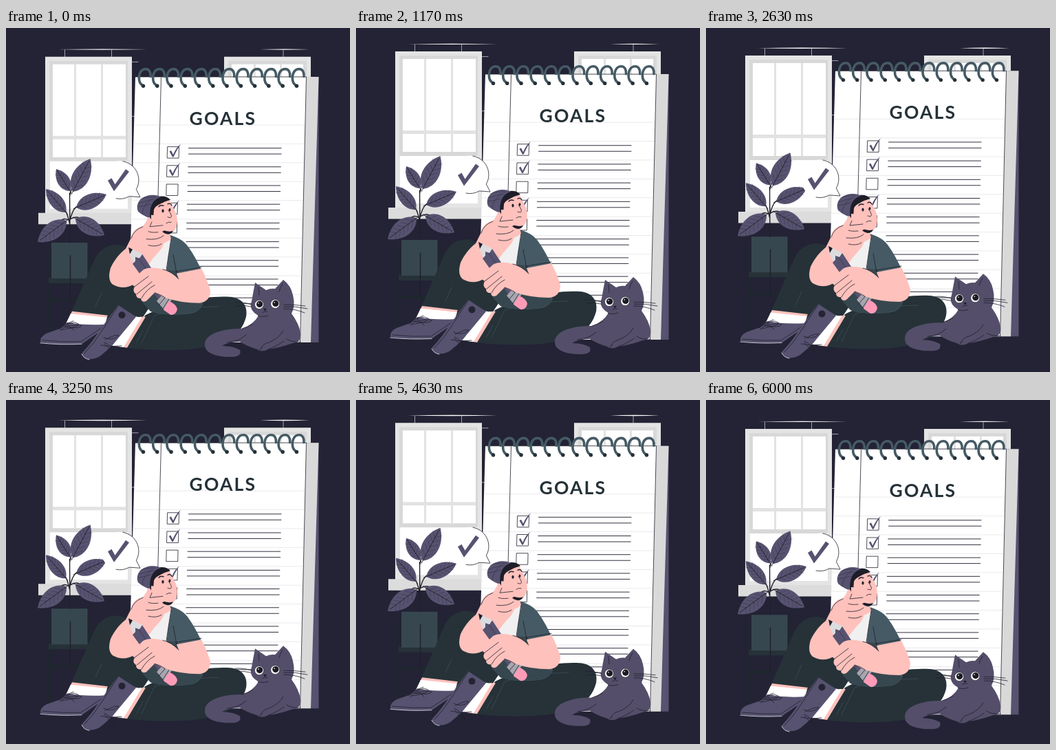
An HTML page for the animation above (6040 ms loop, 500x500 px).

```html
<!DOCTYPE html>
<html lang="en">
<head>
<meta charset="utf-8">
<title>Goals</title>
<style>
  html, body { margin: 0; width: 100%; height: 100%; overflow: hidden; background: #232335; }
  svg { display: block; width: 100vw; height: 100vh; }
  path, line { stroke-linecap: round; stroke-linejoin: round; }
  .purple { fill: #575270; }
  .cat { fill: #544e6a; }
  .skin { fill: #ffc1bc; }
  .dark { fill: #263238; }
  .teal { fill: #455a64; }
  .white { fill: #fff; }
  .ink { fill: none; stroke: #20202c; stroke-width: .8; }
  .bold { fill: none; stroke: #20202c; stroke-width: 1.4; }
  .fold { fill: none; stroke: #40515a; stroke-width: .7; }
  .rail { fill: none; stroke: #d8d8de; stroke-width: .7; }
  .title { font: 700 26.5px Lato, "Open Sans", sans-serif; letter-spacing: 2.2px; fill: #263238; }
</style>
</head>
<body>
<svg viewBox="0 0 500 500">
  <g class="fast">
    <path class="white" d="M75 31.300Q140 29.900 205 31.300Q140 32.700 75 31.300ZM369 31.300Q405 29.900 441 31.300Q405 32.700 369 31.300Z"/>
    <path class="rail" d="M85.500 32V42M153.500 32V42M403 32V42M183 49.500H192M183 128.500H187"/>
    <path fill="#e4e4e4" d="M57 42H183V270H57ZM317 42H443V200H317Z"/>
    <path fill="#d8d8d8" d="M63 48H177V194H63ZM323 48H437V194H323Z"/>
    <path class="white" d="M68 53H174V188H68ZM328 53H432V188H328ZM64 194H177V263H64Z"/>
    <path fill="#e2e2e2" d="M99 53h3v135h-3ZM138 53h3v135h-3ZM68 157H174v5H68ZM360 53h3v135h-3ZM398 53h3v135h-3Z"/>
    <path fill="#dcdcdc" d="M47 269H190V285.500H47Z"/>
  </g>

  <g class="slow">
    <path class="purple" d="M436 71H454.500V457H426Z"/>
    <path fill="#d9d9d9" d="M436 71H454.500L443 457H426Z"/>
    <path class="white" d="M188 71H436.500L427.500 457H177Z"/>
    <g id="rules"></g>
    <path class="ink" d="M188 71H436.500L427.500 457M225.500 72L215.500 457"/>
    <g id="rings"></g>
    <text class="title" x="266.500" y="140.800">GOALS</text>
    <g id="tasks"></g>
  </g>

  <g class="slow">
    <path fill="none" stroke="#1e282d" stroke-width="3" d="M63 324V450M121.500 324V440M62 367H123M62 395H122"/>
    <path class="dark" d="M62 363H123V371H62Z"/>
    <path fill="#37474f" d="M66 312H118.500V364H66Z"/>
    <path class="bold" d="M93.500 331V395"/>
    <path class="bold" d="M93 312L92.500 240M92.500 281Q97 262 104 259M92.500 284Q88 265 84 263M92.500 280Q84 274 78 282M93 278Q104 271 112 280M92.500 245Q94 234 100 225"/>
    <g id="leaves"></g>
  </g>

  <g class="fast">
    <path class="white" d="M189.300 234.800L195 246L179.300 244.800A27.500 27.500 0 1 1 189.300 234.800Z"/>
    <path class="ink" d="M170 194A27.500 27.500 0 0 1 189.300 234.800L195 246L179.300 244.800A27.500 27.500 0 0 1 160 248"/>
    <path class="purple" d="M148 222L153.500 218.500L158.500 227.500L174 205.500L179 209L157 237.500Z"/>
  </g>

  <g class="fast">
    <!-- legs -->
    <path class="dark" d="M95 413L128 338C138 314 164 309 180 323L214 398L196 425L146 428Z"/>
    <path class="dark" d="M174 465L202 418C229 403 291 388 325 391C343 392 352 404 349 420C341 451 314 461 279 466C241 470 205 469 174 465Z"/>
    <path class="fold" d="M197 458L216 418Q250 406 309 405M130 405L139 385M190 457L199 440"/>
    <!-- shoes and socks -->
    <path class="skin" d="M96 412L148 418L145 424L93 418Z"/>
    <path class="white" d="M94 415.500L147 421L143 434L87 430Z"/>
    <path class="purple" d="M50 457Q49 449 59 444L79 437L89 428Q114 433 145 431L137 441L111 459Q80 462 50 457Z"/>
    <path fill="none" stroke="#d9d9e2" stroke-width=".9" d="M50 458Q78 461 110 459.500"/>
    <path class="ink" d="M53 454Q81 457 109 456L139 436M77 438Q88 429 98 426M79 440Q95 423 105 430Q109 434 80 439M84 435Q105 430 110 433Q107 438 86 435M89 431L99 440"/>
    <path class="skin" d="M194 420L203 420L176 465L162 463Z"/>
    <path class="white" d="M185 419L197 421L171 464L154 462Z"/>
    <path class="purple" d="M163 403L189 420L155 461Q147 469 137 477Q127 483 117 481Q109 477 111 472Q126 456 135 441Z"/>
    <path fill="none" stroke="#d9d9e2" stroke-width=".9" d="M110 474Q113 481 121 482"/>
    <path class="ink" d="M163 404L139 441Q128 459 114 473M142 450Q155 456 164 447Q160 445 144 453M143 457Q154 462 159 474Q151 469 143 459M138 461L151 463L168 462"/>
    <circle cx="168.500" cy="417.500" r="5" fill="#242432"/>

    <!-- torso -->
    <path class="teal" d="M238 301C250 305 258 309 264 317C272 328 279 341 284 352L258 358L286 401Q281 415 262 416Q229 419 210 412L196 396L202 315Z"/>
    <path fill="#37474f" d="M233 352L249 353L266 391L285 402Q280 416 255 416Q226 418 210 412L196 396L202 370Z"/>
    <path fill="#f0f0f0" d="M207 312L235 300L240 309L236 332L233 356L199 368Z"/>
    <path class="ink" d="M240 306L236 332L233 352M247 354L284 348M248 357L243 330"/>

    <!-- head -->
    <path class="skin" d="M210 258L236 247L242 259L247 269Q250 279 248 288Q245 297 238 299L240 307Q225 319 209 312L214 288Z"/>
    <path fill="#1d1e28" d="M224 291Q233 298 243 295Q241 300 235 300Q227 299 224 291Z"/>
    <path fill="#1d1e28" d="M207 274Q205 255 218 246Q232 242 239 250Q231 252 224 256Q217 259 215 264L214 277Q211 281 208 278Z"/>
    <path class="purple" d="M191 264C189 251 200 243 214 243Q221 243 225 246C213 249 208 260 209.500 277Q199 273 192 267Z"/>
    <path class="ink" opacity=".5" d="M193 255Q203 251 215 249M192 260Q201 259 210 256M195 249Q204 245 217 246M198 271Q198 259 211 249"/>
    <path class="skin" d="M211 272Q218 271 218 279Q217 286 211 283Z"/>
    <path class="bold" d="M222 260Q224 257 229 258.500M235 256Q239 254 241 258"/>
    <path class="ink" d="M236 265Q243 274 239 276L235 275M233 284Q236 281.500 240 282.500"/>
    <ellipse cx="228" cy="266" rx="1.600" ry="2.500" fill="#20202c"/>
    <ellipse cx="238" cy="264.500" rx="1.400" ry="2.300" fill="#20202c"/>

    <!-- raised arm -->
    <path class="skin" d="M182 305Q184 292 199 288Q205 281 206 276Q210 273 212 282L228 286Q234 289 231 294Q227 297 221 297L231 301Q233 309 226 321L213 336L187 372Q171 382 155 373Q147 366 152 349C157 338 165 328 174 321Z"/>
    <path class="ink" d="M212 282L209 289L228 287M221 297Q211 298 207 296M229 302Q221 309 204 307M226 314Q219 319 207 316M182 306Q185 294 199 289"/>

    <!-- pencil -->
    <path fill="#dcdcdf" d="M178 319L199 329L190 347Q181 340 178 319Z"/>
    <path fill="#20202c" d="M178 319L184 322L180 329Z"/>
    <path class="purple" d="M198 329L238 390L227 403L184 343L188 339L188 333L194 335Z"/>
    <path class="ink" d="M193 335L234 395" opacity=".5"/>
    <path fill="#a7a5ae" d="M229 386L241 395L230 410L219 397Z"/>
    <path fill="#ff9bb7" d="M237 397Q248 402 249 409Q247 418 239 417L229 410Z"/>
    <path class="ink" d="M233 390L222 403M237 394L228 408"/>

    <!-- resting arm -->
    <path class="skin" d="M248 357L284 350Q293 367 297 382Q297 398 281 400Q253 400 231 392L216 385L204 397Q197 400 196 393Q189 394 189 387Q183 383 187 376Q181 373 183 367L199 352Q209 346 228 351Q240 354 251 365Z"/>
    <path class="ink" d="M187 376L207 361M190 387L212 369M197 393Q204 380 216 374M216 385Q224 387 231 392M251 365Q241 354 228 351"/>
  </g>

  <g class="slow">
    <path class="cat" d="M362 370L378 381Q385 378 391 379L403 366Q414 374 417 388Q421 404 415 415Q426 430 428 443Q430 457 417 458Q397 465 381 467Q371 472 365 467Q351 463 340 456Q322 456 314 462Q330 462 340 468Q343 477 330 478Q298 479 290 466Q285 451 304 443Q322 436 343 437Q360 431 367 418Q352 410 357 397Z"/>
    <path class="ink" d="M366 418Q372 421 381 418M322 457Q338 456 349 446M343 437Q353 434 359 430M371 466Q373 459 382 457Q397 451 403 440M381 467Q391 464 404 455M369 468L372 464M408 452Q415 457 428 456M367 377L368 388M402 372Q398 378 397 383"/>
    <path class="ink" d="M357 402Q346 398 333 399M356 405Q345 402 335 404M404 405Q420 404 438 408M404 408Q420 408 434 414M404 402Q420 402 435 404"/>
    <g id="eyes"></g>
    <path class="bold" d="M375 408.500L378 408.500L376.500 410Z"/>
    <path class="ink" d="M373 413Q376 414 376.500 410Q377 414 380 412"/>
  </g>
</svg>
<script>
const LOOP = 6040, LIFT = 10, LEAD = 60;
const put = (id, html) => document.getElementById(id).insertAdjacentHTML('beforeend', html);
const path = (d, attrs) => `<path d="${d}" ${attrs}/>`;
const slant = y => (71 - y) * .026;

for (let i = 0; i < 12; i++) {
  put('rings', `<g transform="translate(${i * 20.27} 0)">` +
    path('M199.500 84C193 81 192 72 194.500 66C196.500 61 200 59.600 203 59.600C208.500 59.600 210.500 65 210 70.500',
      'fill="none" stroke="#455a64" stroke-width="3.6"') +
    '<circle cx="199.500" cy="84.300" r="2.700" fill="#263238"/></g>');
}

for (let i = 0; i < 11; i++) {
  const y = 141 + i * 27.4, dx = slant(y);
  put('rules', path(`M${188 + dx} ${y}H${436 + dx}`, 'stroke="#dcdce1" stroke-width=".6"'));
}

const done = [0, 1, 3];
for (let i = 0; i < 9; i++) {
  const y = 174.6 + i * 27.2, dx = slant(y) + 2.7;
  put('tasks', path(`M${265.5 + dx} ${y}H${400 + dx}M${265.5 + dx} ${y + 8.5}H${400 + dx}`, 'stroke="#30303f" stroke-width="1"'));
  if (i < 5) put('tasks', path(`M${235 + dx} ${y - 2}h16.500l-.4 16.500h-16.500Z`, 'class="ink"'));
  if (done.includes(i)) put('tasks', path(`M${237.5 + dx} ${y + 5}l2.500 -1.500l3 6q4 -10 11 -15.500q-6 9 -10.500 19h-1.500Z`, 'class="purple"'));
}

// A leaf spans base to tip; side veins branch off its midrib.
function leaf(bx, by, tx, ty, width) {
  const len = Math.hypot(tx - bx, ty - by), angle = Math.atan2(ty - by, tx - bx) * 180 / Math.PI;
  let veins = '';
  for (let k = 1; k < 6; k++) {
    const x = len * k * .14, w = width * .36;
    veins += `M${x} 0l${len * .14} ${w}M${x} 0l${len * .14} ${-w}`;
  }
  const side = s => `${len * .22} ${s * width * .78} ${len * .68} ${s * width * .72}`;
  put('leaves', `<g transform="translate(${bx} ${by}) rotate(${angle})">` +
    path(`M0 0C${side(-1)} ${len} 0C${len * .68} ${width * .72} ${len * .22} ${width * .78} 0 0Z`, 'class="purple"') +
    path(`M-4 0H${len * .92}`, 'class="ink"') +
    path(veins, 'class="ink" opacity=".35"') + '</g>');
}
leaf(97, 238, 122.5, 190, 22);
leaf(93, 237, 73, 205, 16);
leaf(87, 268, 58, 234, 17);
leaf(102, 261, 146, 242, 19);
leaf(88, 280, 46, 311, 22);
leaf(101, 277, 143, 301, 21);

for (const [x, y] of [[368, 402], [391.2, 401]])
  put('eyes', `<circle cx="${x}" cy="${y}" r="6.500" fill="#f8f8f4" stroke="#20202c" stroke-width=".6"/>` +
    `<circle cx="${x + .6}" cy="${y - .6}" r="4.600" fill="#1b1b26"/><circle cx="${x - 1}" cy="${y - 2}" r=".8" fill="#fff"/>`);

// Linear rise and fall, once per period.
const rise = (t, period) => {
  const p = ((t + LEAD) % period) / period;
  return .2 - LIFT * (1 - Math.abs(1 - 2 * p));
};
const groups = [['.slow', LOOP], ['.fast', LOOP / 2]]
  .map(([name, period]) => [document.querySelectorAll(name), period]);
const start = performance.now();
function draw() {
  const t = Math.max(0, performance.now() - start) % LOOP;
  for (const [parts, period] of groups)
    for (const part of parts) part.setAttribute('transform', `translate(0 ${rise(t, period).toFixed(2)})`);
  requestAnimationFrame(draw);
}
draw();
</script>
</body>
</html>
```
